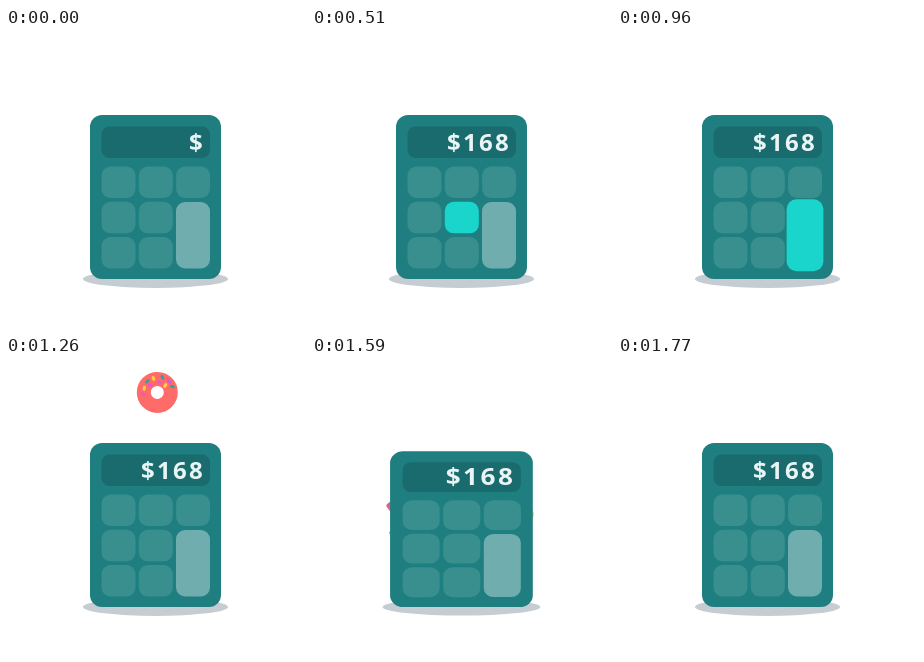
An HTML page that plays this animation: 300x300 px, repeating every 1.8 s.

```html
<!DOCTYPE html>
<html lang="en">
<head>
<meta charset="utf-8">
<title>Calculator</title>
<style>
  html, body { margin: 0; width: 100%; height: 100%; overflow: hidden; background: #fff; }
  svg { display: block; width: 100%; height: 100%; }
  text { font: 700 24px "Open Sans", "Noto Sans", sans-serif; letter-spacing: 2.3px; fill: #e9f5f5; text-anchor: end; }
  .line { fill: none; stroke-linecap: round; stroke-linejoin: round; }
</style>
</head>
<body>
<svg viewBox="0 0 300 300">
  <g id="items">
    <g data-x="-110" data-y="-77">
      <circle r="17.2" fill="#1f80f2"/>
      <circle r="10" class="line" stroke="#1f6f8c" stroke-width="3"/>
      <circle r="6.3" class="line" stroke="#e4f2ff" stroke-width="2.6" style="stroke-dasharray:3.4 3.2;stroke-linecap:butt"/>
      <circle r="2" fill="#e4f2ff"/>
    </g>
    <g data-x="108" data-y="-75">
      <path d="M-6-15H6L17-9 14 2 9 0V16H-9V0L-14 2-17-9Z" fill="#ff9a7e" stroke="#ff9a7e" stroke-width="2" stroke-linejoin="round"/>
      <path d="M-6-15Q0-6 6-15" class="line" stroke="#ff5a5c" stroke-width="3"/>
      <circle cx="1" cy="5.5" r="2" fill="#c58a9a"/>
      <circle cx="4" cy="1" r="2" fill="#f5c63c"/>
      <circle cx="-2" cy="-1" r="2" fill="#4a9aa0"/>
      <circle cx="-3" cy="4" r="1.6" fill="#f5c63c"/>
    </g>
    <g data-x="-125" data-y="0">
      <rect x="-13" y="-2" width="26" height="18" rx="2" fill="#dc618d"/>
      <rect x="-15" y="-9" width="30" height="8" rx="2" fill="#ff8ab5"/>
      <path d="M0-9V16" class="line" stroke="#f93c4c" stroke-width="4" style="stroke-linecap:butt"/>
      <g class="line" stroke="#f93c4c" stroke-width="2.2">
        <ellipse cx="-4.6" cy="-12.5" rx="4" ry="3"/>
        <ellipse cx="4.6" cy="-12.5" rx="4" ry="3"/>
      </g>
    </g>
    <g data-x="123" data-y="13">
      <path d="M-9-13H9C16-13 19 3 17 10 15 16 9 13 6 8H-6C-9 13-15 16-17 10-19 3-16-13-9-13Z" fill="#ffc90e"/>
      <path d="M-7-5V6M-12.500.5H-1.500" class="line" stroke="#1f8080" stroke-width="4" style="stroke-linecap:butt"/>
      <circle cx="8" cy="-4" r="2" fill="#f08a3c"/>
      <circle cx="12" cy="0" r="2" fill="#ff6b62"/>
      <circle cx="5" cy="0" r="2" fill="#58a08c"/>
      <circle cx="8.500" cy="4" r="2" fill="#f08a3c"/>
    </g>
    <g data-x="-115" data-y="71">
      <path d="M-16-12 17-11 13 13-16 13Z" fill="#1df2b3" stroke="#1df2b3" stroke-width="3" stroke-linejoin="round"/>
      <path d="M6-6H12" class="line" stroke="#1c8f86" stroke-width="3.500"/>
    </g>
    <g data-x="109" data-y="82">
      <path d="M-5-13V-18H5V-13" class="line" stroke="#7a4fc0" stroke-width="2.500"/>
      <rect x="-13" y="-14" width="26" height="29" rx="3.500" fill="#c08af0"/>
      <path d="M-8-8H8M-8-3H8" class="line" stroke="#8450c8" stroke-width="2.200"/>
      <path d="M-8 15V17M8 15V17" class="line" stroke="#7a4fc0" stroke-width="3"/>
    </g>
  </g>
  <g id="donut">
    <circle r="13.500" class="line" stroke="#ff6b68" stroke-width="14"/>
    <g id="sprinkles" class="line" stroke-width="3"></g>
  </g>
  <g id="calc">
    <ellipse cx="149.500" cy="251" rx="72.500" ry="9" fill="#c5cdd3"/>
    <rect x="84" y="87" width="131" height="164" rx="12" fill="#1f7f80"/>
    <rect x="95.500" y="98.500" width="108.500" height="31.500" rx="8" fill="#1a6b6d"/>
    <text id="display" x="199" y="123"></text>
    <g id="keys"></g>
  </g>
</svg>
<script>
const LOOP = 1800, PRESS = 180, LIT = '#1ad5cb';
const $ = id => document.getElementById(id);

function add(parent, tag, attrs) {
  const el = document.createElementNS('http://www.w3.org/2000/svg', tag);
  for (const name in attrs) el.setAttribute(name, attrs[name]);
  return parent.appendChild(el);
}

function makeKey(x, y, height, color, presses) {
  const el = add($('keys'), 'rect', { x, y, width: 34, height, rx: 9 });
  return { el, cx: x + 17, cy: y + height / 2, color, presses };
}

// Press start times by key position, column then row
const pressTimes = { '0,0': [150], '2,0': [330], '1,1': [510] };
const keys = [makeKey(170, 174, 66.5, '#6fadae', [870])];
for (let row = 0; row < 3; row++)
  for (let col = 0; col < (row ? 2 : 3); col++)
    keys.push(makeKey(95.5 + col * 37.3, 138.5 + row * 35.3, 31.5, '#398e8e', pressTimes[[col, row]] || []));

// Sprinkles: x, y, tilt, colour
[[-14, 2, 30, '#e858c8'], [-13, -4, 100, '#ffd03c'], [-7, -7, 20, '#e858c8'],
 [-10, -11, 130, '#3a9ea0'], [-4, -14, 70, '#ffd03c'], [2, -10, 40, '#e858c8'],
 [5, -15, 60, '#3a9ea0'], [8, -7, 120, '#ffd03c'], [12, -11, 40, '#c860e0'],
 [15, -6, 20, '#3a9ea0']].forEach(([x, y, tilt, stroke]) =>
  add($('sprinkles'), 'path', { d: 'M-1 0H1', stroke, transform: `translate(${x} ${y}) rotate(${tilt})` }));

const progress = (t, start, length) => Math.min(1, Math.max(0, (t - start) / length));
const pulse = p => Math.sin(Math.PI * p);

function draw(t) {
  $('display').textContent = '$168'.slice(0, 1 + [150, 330, 510].filter(s => t >= s).length);

  for (const { el, cx, cy, color, presses } of keys) {
    const start = presses.find(s => t >= s && t < s + PRESS);
    const scale = start === undefined ? 1 : 1 + 0.08 * pulse((t - start) / PRESS);
    el.setAttribute('fill', start === undefined ? color : LIT);
    el.setAttribute('transform', `translate(${cx} ${cy}) scale(${scale}) translate(${-cx} ${-cy})`);
  }

  // Toss: cubic ease out to the apex, cubic ease in back down
  const y = 35.3 + 105 * Math.abs((t - 1320) / 270) ** 3;
  $('donut').style.display = t >= 1050 && t < 1590 ? '' : 'none';
  $('donut').setAttribute('transform', `translate(151.3 ${y}) rotate(${(t - 1260) * 0.58})`);

  // Landing: squash the calculator and fling the items out and back
  const burst = progress(t, 1560, 210), amount = pulse(burst);
  $('calc').setAttribute('transform',
    `translate(150 251) scale(${1 + 0.2 * amount} ${1 - 0.113 * amount}) translate(-150 -251)`);
  $('items').style.display = burst > 0 && burst < 1 ? '' : 'none';
  for (const item of $('items').children) {
    const { x, y } = item.dataset;
    item.setAttribute('transform',
      `translate(${150 + x * amount} ${150 + y * amount}) rotate(${360 * burst})`);
  }
}

function frame() {
  draw(performance.now() % LOOP);
  requestAnimationFrame(frame);
}
frame();
</script>
</body>
</html>
```
